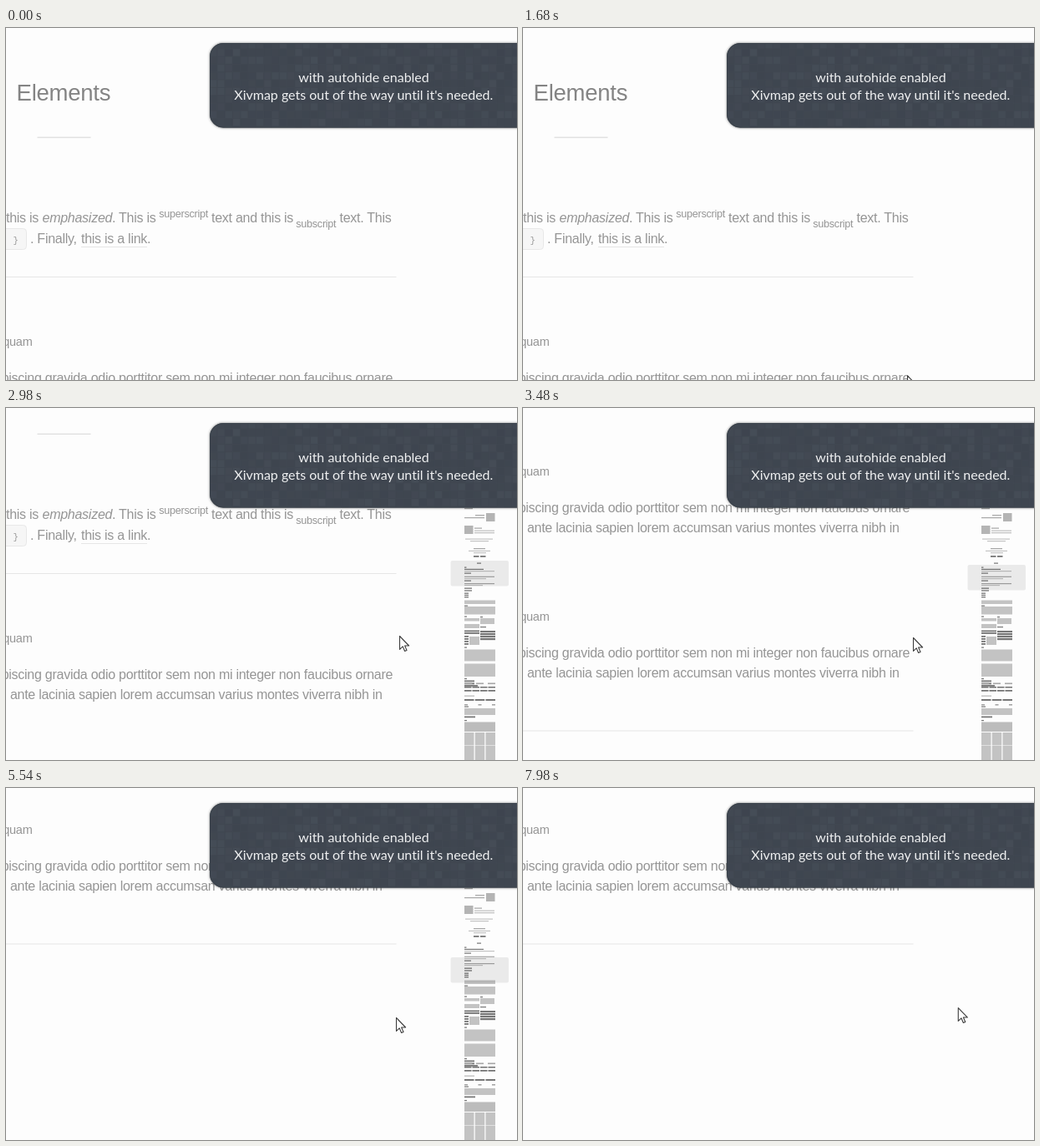
An HTML page that plays this animation: 612x422 px, repeating every 8 s.

```html
<!DOCTYPE html>
<html lang="en">
<head>
<meta charset="utf-8">
<title>Autohiding minimap</title>
<style>
  html, body { margin: 0; width: 100%; height: 100%; overflow: hidden; background: #fdfdfd; }
  svg { display: block; width: 612px; height: 422px; }
  text { font-family: "Liberation Sans", Arial, sans-serif; font-size: 16px; letter-spacing: -.26px; fill: #959595; }
  .end { text-anchor: end; }
  .small { font-size: 12.6px; }
  #banner { filter: drop-shadow(0 0 1.5px rgba(0, 0, 0, .5)); }
  #banner text {
    font-family: Lato, sans-serif; font-size: 16px; letter-spacing: 0;
    font-variant-ligatures: none; fill: #f0f1f2; text-anchor: middle;
  }
</style>
</head>
<body>
<svg viewBox="0 0 612 422">
  <defs>
    <clipPath id="panel"><rect x="244" y="18" width="390" height="101.5" rx="16"/></clipPath>
  </defs>

  <g id="page">
    <text x="12.6" y="86.6" style="font-size:27.5px;fill:#848484">Elements</text>
    <rect x="37.5" y="130.5" width="64" height="1.5" fill="#e2e2e2"/>

    <text x="0" y="233.4">this is</text>
    <text x="43.5" y="233.4" font-style="italic">emphasized</text>
    <text x="127" y="233.4">. This is</text>
    <text x="183.3" y="226.6" class="small">superscript</text>
    <text x="246" y="233.4">text and this is</text>
    <text x="347.3" y="239" class="small">subscript</text>
    <text x="399.5" y="233.4">text. This</text>

    <rect x="-20" y="240.5" width="44.5" height="25" rx="4" fill="#f6f6f6" stroke="#e8e8e8"/>
    <text x="8.5" y="257.5" style="font:10.5px 'Liberation Mono',monospace">}</text>
    <text x="29" y="258">. Finally,</text>
    <text x="90" y="258">this is a link</text>
    <text x="169" y="258">.</text>
    <path d="M90 262.5H169" stroke="#e6e6e6"/>
  </g>

  <g id="map"></g>

  <g id="banner">
    <rect x="244" y="18" width="390" height="101.5" rx="16" fill="#404751"/>
    <g id="tiles" clip-path="url(#panel)"></g>
    <rect x="244.5" y="18.5" width="390" height="100.5" rx="15.5" fill="none" stroke="#3a424b"/>
    <text x="428.5" y="65">with autohide enabled</text>
    <text x="428.3" y="85.5">Xivmap gets out of the way until it's needed.</text>
  </g>

  <path id="cursor" d="M.5 .5V16.4L4.2 12.9L6.6 18.5L9 17.4L6.6 12H11.6Z"
        fill="#fff" stroke="#3c3c3c" stroke-width="1.1" stroke-linejoin="round"/>
</svg>

<script>
const LOOP = 8000;
const $ = id => document.getElementById(id);
const page = $('page'), map = $('map'), cursor = $('cursor');

function add(parent, tag, attrs, label) {
  const el = document.createElementNS('http://www.w3.org/2000/svg', tag);
  for (const key in attrs) el.setAttribute(key, attrs[key]);
  if (label) el.textContent = label;
  parent.append(el);
  return el;
}

const box = (parent, x, y, width, height, fill) =>
  add(parent, 'rect', { x, y, width, height, fill });

// Page sections below the intro
function section(y) {
  const line = (x, dy, label, size = 16) =>
    add(page, 'text', { x, y: y + dy, class: 'end', style: `font-size:${size}px` }, label);
  line(31.5, 0, 'Aliquam', 14.5);
  line(463.2, 43.5, 'adipiscing gravida odio porttitor sem non mi integer non faucibus ornare');
  line(450.7, 67.5, 'vel ante lacinia sapien lorem accumsan varius montes viverra nibh in');
}
const rule = y => box(page, 0, y, 467.5, 1, '#e6e6e6');
rule(298);
section(381);
section(555);
rule(686.5);

// Banner texture
let seed = 11;
const random = () => (seed = seed * 16807 % 2147483647) / 2147483647;
for (let y = 16; y < 120; y += 9.3) {
  for (let x = 244; x < 612; x += 9.3) {
    const light = random() < .5;
    add($('tiles'), 'rect', {
      x, y, width: 8.3, height: 8.3,
      fill: light ? '#606a75' : '#343b45',
      opacity: (random() * .16).toFixed(2)
    });
  }
}

// Minimap
const LIGHT = '#c3c3c3', MID = '#a6a6a6', DARK = '#777';
const bar = (x, y, w, fill = MID, h = 1.2) => box(map, x, y, w, h, fill);
const block = (y, h, fill = LIGHT) => bar(549, y, 37, fill, h);
function bars(x, y, w, count, step, fill = MID, h = 1.3) {
  for (let i = 0; i < count; i++) bar(x, y + i * step, w, fill, h);
}
function across(y, count, w, fill, h = 1.6) {
  const step = (37 - w) / (count - 1);
  for (let i = 0; i < count; i++) bar(549 + i * step, y, w, fill, h);
}

function drawMap() {
  bar(549, 120, 10);
  bar(562, 128, 11);
  bar(549, 131, 24);
  bar(561, 143.5, 9);
  bar(575, 126, 10.5, '#b4b4b4', 10);
  bar(549, 141, 10.5, '#b4b4b4', 10);
  bars(561, 146.5, 24, 2, 2.5, LIGHT);
  bar(550, 156.5, 33, LIGHT);
  bar(556, 159, 22, LIGHT);
  bar(560, 168, 14);
  bar(554, 170.8, 26, LIGHT);
  bar(560, 173, 15, LIGHT);
  bar(560, 177, 6.5, DARK, 1.8);
  bar(568, 177, 6.5, DARK, 1.8);
  bar(564, 185.5, 5, DARK);

  bar(549, 190.5, 2.5, DARK);
  bar(549, 192.8, 23, DARK);
  bar(549, 195, 36, LIGHT);
  bar(549, 197.5, 8, DARK);
  bar(549, 201.7, 36);
  bar(549, 204, 26, LIGHT);
  bar(549, 206.5, 8, DARK);
  bar(549, 210, 36);
  bar(549, 212, 22, LIGHT);
  bars(549, 215.5, 9, 2, 2.8, DARK);
  bars(549, 221.5, 5, 3, 2.3, DARK);

  block(230.5, 4.5);
  bar(549, 236.5, 4, DARK);
  block(238, 9.5);
  bar(549, 249.5, 3, DARK);
  bar(549, 252, 18, LIGHT, 3.5);
  bar(568, 252, 17, LIGHT, 7);
  bar(568, 250, 3, DARK);
  bar(549, 259, 18, LIGHT, 5);
  bar(568, 262, 7, DARK);
  bars(549, 266.5, 18, 2, 2.6, DARK, 1.8);
  bars(549, 273, 5, 4, 3, DARK, 1.8);
  bar(555, 274, 12, LIGHT, 10);
  bars(568, 267, 18, 4, 3, DARK, 2.2);
  bar(549, 286.5, 3, DARK);
  block(289.5, 14);
  block(306.5, 15.5);

  bar(549, 324, 3, DARK);
  bars(549, 326.5, 12, 2, 3, DARK, 1.8);
  across(329.5, 3, 9, MID);
  bar(549, 332, 16, DARK, 1.8);
  across(334, 4, 8.5, DARK);
  across(338, 4, 8.5, DARK, 1.8);
  bar(549, 344.5, 12, LIGHT, 1.5);
  across(349, 3, 11.5, DARK, 2);
  across(355, 3, 4, MID);
  bar(549, 357.5, 5, DARK);
  block(360, 8);
  bar(549, 369.5, 13, DARK, 1.8);
  bar(549, 374, 3, DARK);
  block(376.5, 11.5, '#bcbcbc');
  across(389, 3, 11.5, LIGHT, 15.5);
  across(405, 3, 11.5, LIGHT, 17);
}
drawMap();
const view = add(map, 'rect', { x: 532.5, width: 69.5, height: 30.5, rx: 2, fill: '#000', opacity: .075 });

// Motion
const clamp = v => Math.max(0, Math.min(1, v));
const smooth = v => v * v * (3 - 2 * v);
const ramp = (t, start, length) => smooth(clamp((t - start) / length));

const wheel = [2520, 3160, 3460, 3810, 4130];
const path = [
  [1600, 459, 424], [2200, 479, 271], [2480, 479, 271], [2980, 471, 273],
  [3400, 467, 275], [7750, 467, 275], [7990, 521, 263]
];

function pointer(t) {
  let i = 0;
  while (i < path.length - 2 && t > path[i + 1][0]) i++;
  const [t0, x0, y0] = path[i], [t1, x1, y1] = path[i + 1];
  const k = ramp(t, t0, t1 - t0);
  return [x0 + (x1 - x0) * k, y0 + (y1 - y0) * k];
}

function render(t) {
  const scroll = 100 * wheel.filter(at => t >= at).length;
  const shift = wheel.reduce((sum, at) => sum + ramp(t, at + 30, 200), 0);
  page.setAttribute('transform', `translate(0 ${-scroll})`);
  view.setAttribute('y', 178 + 5 * shift);
  map.setAttribute('opacity', ramp(t, 2480, 400) - ramp(t, 5780, 480));
  cursor.setAttribute('transform', `translate(${pointer(t)})`);
}

const begin = performance.now();
function tick() {
  render((performance.now() - begin) % LOOP);
  requestAnimationFrame(tick);
}
tick();
</script>
</body>
</html>
```
